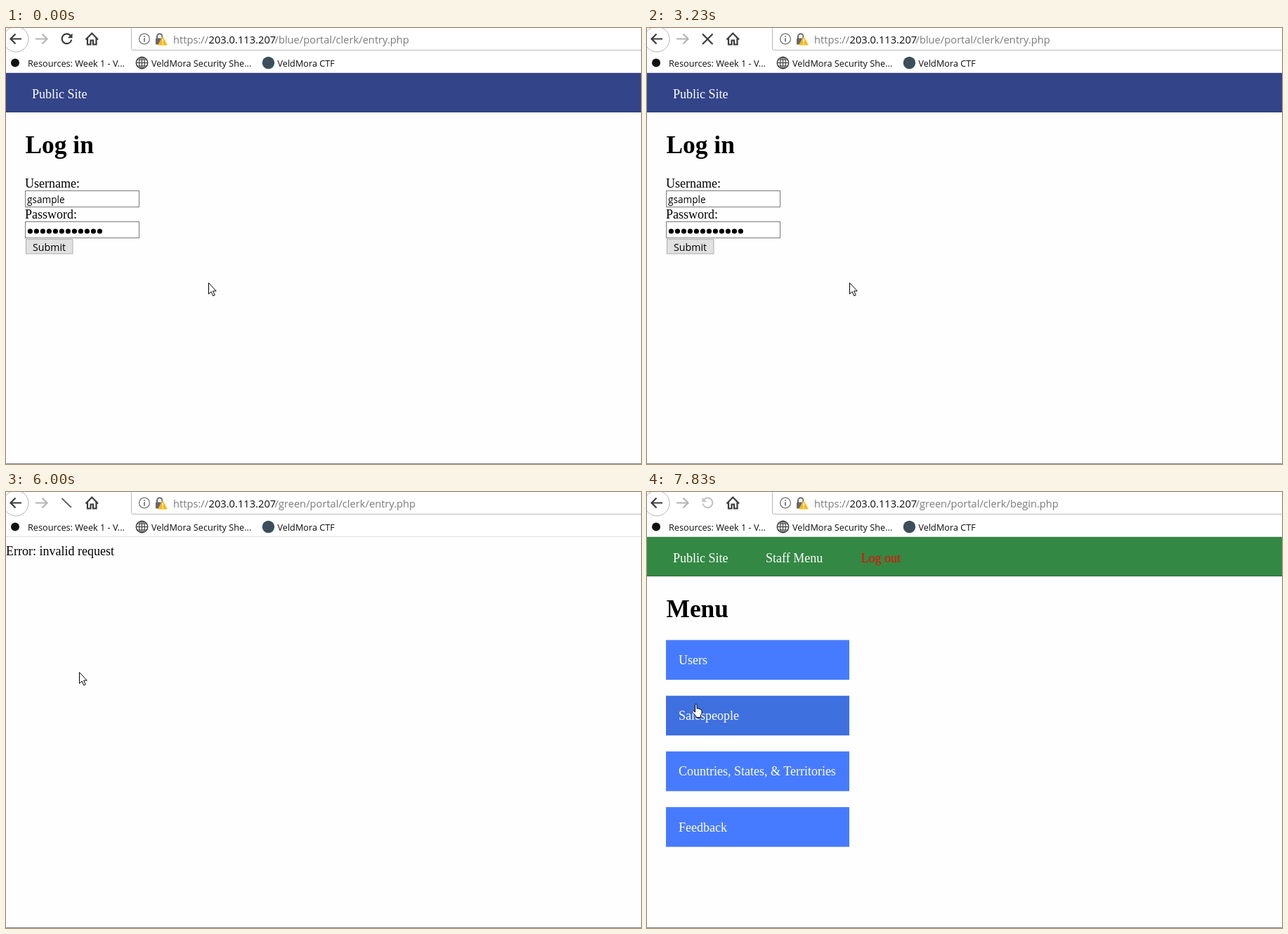
Animation, 904 px wide and 620 px high, one loop 7.99 s. Source, as an HTML page:

```html
<!DOCTYPE html>
<html lang="en">
<head>
<meta charset="utf-8">
<title>Log in</title>
<style>
  html, body { margin: 0; width: 100%; height: 100%; overflow: hidden; background: #fefefe; }
  svg { display: block; width: 100%; height: 100%; }
  .ui { font-family: "Open Sans", "Noto Sans", sans-serif; }
  .page { font: 18px "Liberation Serif", "Times New Roman", serif; }
  .title { font-size: 35.4px; font-weight: bold; }
  .bookmark { font-size: 12.7px; fill: #0c0c0d; }
  .address { font-size: 14.7px; fill: #7b7b7f; }
  .line { fill: none; stroke: #3b3b3d; stroke-width: 2.2; }
</style>
</head>
<body>
<svg viewBox="0 0 904 620" preserveAspectRatio="none">
  <rect width="904" height="620" fill="#fefefe"/>

  <g class="ui">
    <rect width="904" height="63" fill="#fff"/>
    <path d="M0 63.5H904" stroke="#e0e0e1"/>
    <rect id="field" x="178.5" y="-4.5" width="740" height="36" rx="2" fill="#fff" stroke="#b8b8b9"/>

    <circle cx="14" cy="16" r="18" fill="#fff" stroke="#b4b4b5"/>
    <path class="line" d="M22 15.5H6.5M13.5 8.5L6.5 15.5L13.5 22.5"/>
    <path id="forward" class="line" d="M42 15.5H58.5M51.5 8.5L58.5 15.5L51.5 22.5"/>
    <path class="line" d="M113.5 16.5L122.3 7.5L131 16.5M116 14.5V23.5H120.5V17.5H124V23.5H128.5V14.5"/>

    <g id="ring">
      <path class="line" d="M91.5 10.5A6.9 6.9 0 1 0 93.3 16.6"/>
      <path d="M94.5 7.5V14.3H87.7Z"/>
    </g>
    <path id="arc" class="line" d="M91.5 10.5A6.9 6.9 0 0 0 81 20" style="stroke:#b9b9ba"/>
    <path id="smallSlash" class="line" d="M79.5 10.5L88.5 19.3" style="stroke:#777779;stroke-width:1.9"/>
    <path id="slash" class="line" d="M79.5 9L92.8 22" style="stroke:#606063;stroke-width:1.9"/>
    <path id="cross" class="line" d="M79 8.5L93.5 23M93.5 8.5L79 23"/>

    <g fill="none" stroke="#737377" stroke-width="1.3">
      <circle cx="197" cy="15.5" r="7.4"/>
      <path d="M197 14.2V19.5M197 11V12.8" stroke-width="1.8"/>
    </g>
    <path d="M215 15V12A3.7 3.7 0 0 1 222.4 12V15" fill="none" stroke="#68686b" stroke-width="2"/>
    <rect x="213" y="14.5" width="10.5" height="9" rx="1" fill="#68686b"/>
    <path d="M223 12.5L229.2 24H216.8Z" fill="#fbb817" stroke="#fbb817" stroke-linejoin="round"/>
    <path d="M223 15.5V20M223 21.2V23" stroke="#fff" stroke-width="1.5"/>

    <text class="address" y="22">
      <tspan x="238">https://</tspan><tspan x="288.5" fill="#0c0c0d">203.0.113.207</tspan><tspan id="path" x="382.5"></tspan>
    </text>

    <circle cx="13" cy="49.5" r="6" fill="#111"/>
    <g fill="none" stroke="#3b3b3d" stroke-width="1.2">
      <circle cx="193.5" cy="49.5" r="8.2" stroke-width="1.5"/>
      <ellipse cx="193.5" cy="49.5" rx="4" ry="8.2"/>
      <path d="M193.5 41V58M185 49.5H202M186.7 45H200.3M186.7 54H200.3"/>
    </g>
    <circle cx="373.5" cy="49.5" r="8.7" fill="#3a4f5b"/>
    <g class="bookmark">
      <text x="31" y="55">Resources: Week 1 - V...</text>
      <text x="207" y="55">VeldMora Security She...</text>
      <text x="386.5" y="55">VeldMora CTF</text>
    </g>
  </g>

  <g class="page">
    <g id="header">
      <rect id="banner" y="64" width="904" height="56"/>
      <path d="M0 119.5H904" stroke="#000" stroke-opacity=".2"/>
      <text x="37" y="100" fill="#fff">Public Site</text>
    </g>

    <g id="login">
      <text class="title" x="27.5" y="178">Log in</text>
      <text x="27" y="227">Username:</text>
      <text x="27" y="271">Password:</text>
      <g fill="#fff" stroke="#7a7a7a">
        <rect x="27.5" y="231.5" width="162" height="23"/>
        <rect x="27.5" y="275.5" width="162" height="23"/>
      </g>
      <text class="ui" x="30" y="249" font-size="13.6">gsample</text>
      <g id="dots"></g>
      <rect id="button" x="28.5" y="300.5" width="66.5" height="20.5"/>
      <text class="ui" x="38" y="317" font-size="14.2">Submit</text>
      <rect id="outline" x="37.5" y="302.5" width="50" height="17" fill="none" stroke="#222" stroke-dasharray="1 1"/>
    </g>

    <text id="error" x="0" y="90">Error: invalid request</text>

    <g id="menu">
      <text x="169" y="100" fill="#fff">Staff Menu</text>
      <text x="304.5" y="100" fill="#f00">Log out</text>
      <text class="title" x="27.5" y="177.5">Menu</text>
      <g id="items"></g>
    </g>
  </g>

  <path d="M0 619.5H904" stroke="#858585"/>
  <path id="arrow" d="M.5 .5V16.3L4.1 12.9L6.8 18.9L9.3 17.8L6.6 12H11.3Z" fill="#fff" stroke="#000"/>
  <path id="hand" d="M4.5 12V2Q4.5 .5 5.7 .5T7 2V7Q9.5 5.8 9.7 7.6Q12 6.6 12.2 8.4Q14 7.8 14 10V14L12.3 17V19.5H5.7V17.5L1 12.5Q0 10.8 1.3 10.3T4.5 12Z" fill="#fff" stroke="#000"/>
</svg>

<script>
const $ = id => document.getElementById(id);
const LOOP = 7990;
const THEMES = { blue: "#334488", green: "#338844" };
const ICONS = ["arc", "smallSlash", "slash", "cross"];

function add(parent, tag, attrs, text = "") {
  const node = document.createElementNS("http://www.w3.org/2000/svg", tag);
  for (const key in attrs) node.setAttribute(key, attrs[key]);
  node.textContent = text;
  parent.append(node);
}

for (let i = 0; i < 12; i++)
  add($("dots"), "circle", { cx: 34.4 + i * 9, cy: 289, r: 3.6 });

["Users", "Salespeople", "Countries, States, & Territories", "Feedback"].forEach((label, i) => {
  const y = 210.5 + i * 79.2;
  add($("items"), "rect", { x: 27, y, width: 261, height: 56.5, fill: i === 1 ? "#3f70e0" : "#477bff" });
  add($("items"), "text", { x: 45, y: y + 34.5, fill: "#fff" }, label);
});

const start = {
  page: "login", theme: "blue", file: "entry.php", icon: "reload",
  field: false, forward: false, button: "plain", cursor: [288, 362], hand: false
};

// Each step changes part of the state from its time (ms) onwards.
const steps = [
  [560, { field: true }],
  [840, { field: false, icon: "smallSlash" }],
  [970, { icon: "slash" }],
  [1100, { icon: "cross" }],
  [1230, { icon: "arc" }],
  [1370, { icon: "grey" }],
  [1500, { icon: "reload" }],
  [1780, { field: true }],
  [1910, { field: false, icon: "smallSlash" }],
  [2050, { icon: "slash" }],
  [2190, { icon: "cross" }],
  [2450, { icon: "arc" }],
  [2590, { icon: "grey" }],
  [2720, { icon: "reload" }],
  [2850, { icon: "smallSlash" }],
  [2980, { icon: "slash" }],
  [3100, { icon: "cross" }],
  [3380, { theme: "green" }],
  [3510, { icon: "arc", cursor: [252, 353] }],
  [3640, { icon: "grey", cursor: [188, 336] }],
  [3770, { icon: "reload", cursor: [128, 316] }],
  [3910, { cursor: [92, 311] }],
  [4050, { cursor: [76, 307], button: "hover" }],
  [4180, { cursor: [66, 305] }],
  [4460, { button: "focus" }],
  [4750, { icon: "smallSlash" }],
  [4900, { page: "error", icon: "cross" }],
  [5050, { icon: "arc", cursor: [70, 297] }],
  [5190, { icon: "grey", cursor: [84, 279] }],
  [5320, { icon: "reload", cursor: [96, 264] }],
  [5460, { cursor: [102, 258] }],
  [5590, { cursor: [104, 256] }],
  [5870, { icon: "smallSlash" }],
  [6000, { icon: "slash" }],
  [6150, { icon: "cross" }],
  [6280, { page: "login", forward: true, button: "blurred" }],
  [6410, { icon: "arc", cursor: [98, 267] }],
  [6550, { icon: "grey", cursor: [82, 285] }],
  [6690, { icon: "reload", cursor: [70, 299], button: "focus" }],
  [6850, { cursor: [67, 302] }],
  [6980, { icon: "smallSlash" }],
  [7110, { icon: "slash" }],
  [7270, { icon: "cross" }],
  [7550, { page: "menu", file: "begin.php", forward: false, hand: true, cursor: [64, 301] }],
  [7680, { icon: "arc" }],
  [7830, { icon: "grey" }]
];

const show = (id, on) => { $(id).style.display = on ? "" : "none"; };
const paint = (id, fill, stroke) => Object.assign($(id).style, { fill, stroke });

function render(s) {
  for (const page of ["login", "error", "menu"]) show(page, s.page === page);
  show("header", s.page !== "error");
  paint("banner", THEMES[s.theme], "none");
  $("path").textContent = `/${s.theme}/portal/clerk/${s.file}`;
  paint("field", "#fff", s.field ? "#0a84ff" : "#b8b8b9");
  $("forward").style.stroke = s.forward ? "#3b3b3d" : "#b4b4b5";

  for (const icon of ICONS) show(icon, s.icon === icon);
  show("ring", !ICONS.includes(s.icon));
  const grey = s.icon === "grey";
  const [curve, head] = $("ring").children;
  curve.style.stroke = head.style.fill = grey ? "#c4c4c5" : "#3b3b3d";
  // The reload sign is still turning into place while it is disabled.
  $("ring").setAttribute("transform", grey ? "translate(173) scale(-1 1)" : "");

  const hovered = s.button === "hover" || s.button === "focus";
  paint("button", hovered ? "#e5f1fb" : "#e1e1e1", s.button === "plain" ? "#adadad" : "#0078d7");
  show("outline", s.button === "focus" || s.button === "blurred");

  show("hand", s.hand);
  show("arrow", !s.hand);
  $(s.hand ? "hand" : "arrow").setAttribute("transform", `translate(${s.cursor})`);
}

const origin = performance.now();
let shown = -1;

function tick() {
  const t = (performance.now() - origin) % LOOP;
  const done = steps.filter(([time]) => time <= t);
  if (done.length !== shown) {
    shown = done.length;
    render(Object.assign({}, start, ...done.map(([, change]) => change)));
  }
  requestAnimationFrame(tick);
}
tick();
</script>
</body>
</html>
```
